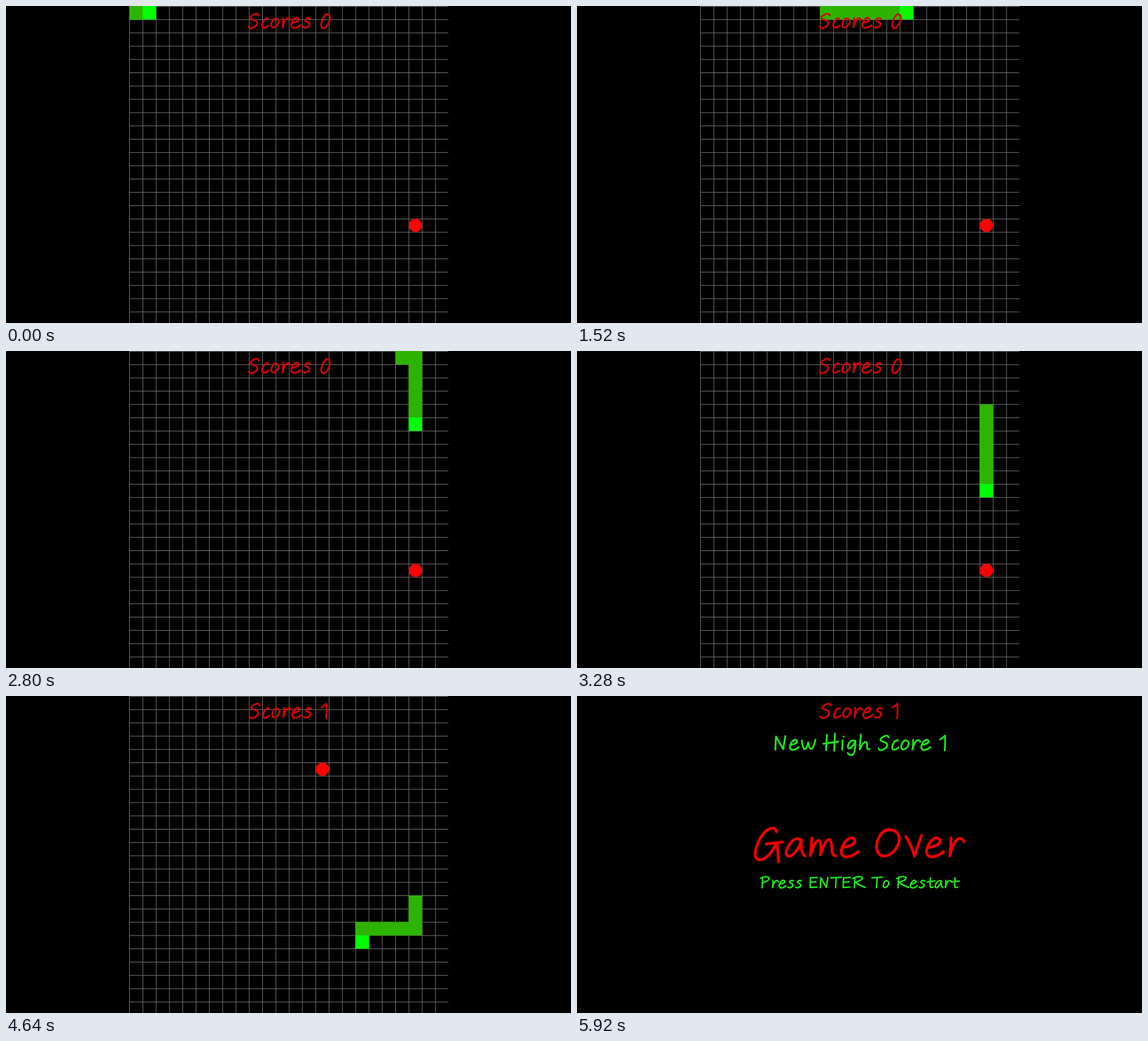
An HTML page with a canvas for the animation above (6 s loop, 926 by 520 pixels).

```html
<!DOCTYPE html>
<html lang="en">
<head>
<meta charset="utf-8">
<title>Snake</title>
<style>
html, body { margin: 0; width: 926px; height: 520px; overflow: hidden; background: #000; }
canvas { display: block; }
</style>
</head>
<body>
<canvas id="stage" width="926" height="520" role="img" aria-label="Snake game: Scores 0, Scores 1, New High Score 1, Game Over, Press ENTER To Restart"></canvas>
<script>
const ctx = document.getElementById("stage").getContext("2d");
const LOOP = 6000, FRAME = 80, TICK = 109.4, LEAD = 20;
const LEFT = 202, CELL = 21.8, COUNT = 24;
const EAT_TICK = 36, END_TICK = 49;

// Handwritten pen strokes, 100 units per em, baseline at y = 0
const pen = {};
const glyph = (ch, advance, d) => { pen[ch] = { advance, path: new Path2D(d) }; };
glyph(" ", 34, "");
glyph("a", 62, "M40-40Q28-52 12-32C-6-6 4 4 16-2Q34-14 41-42Q38-8 50-1");
glyph("c", 44, "M30-42Q20-50 8-30C-4-6 4 2 14 0Q24-2 32-10");
glyph("e", 57, "M4-22Q42-28 36-42Q26-54 10-34C-6-6 6 3 20 1Q34-2 45-12");
glyph("g", 55, "M36-40Q22-50 8-30C-4-8 6-2 16-8Q32-22 38-42C38 0 34 26 18 26Q8 26 2 16");
glyph("h", 58, "M9-72L3-1Q20-40 34-36Q40-28 38-8Q40 0 50-2");
glyph("i", 29, "M7-44L5 0M11-62L12-61");
glyph("m", 77, "M5-46L2-2Q14-44 24-40Q30-34 27-4Q40-46 50-42Q56-36 56-12Q58-2 65-1");
glyph("o", 50, "M20-44C6-40-4-14 4-4C14 6 36-12 36-30Q34-46 16-43");
glyph("r", 43, "M7-46Q8-24 4-1Q14-42 28-45Q36-46 40-37");
glyph("s", 49, "M34-42Q24-50 12-40Q6-32 18-28C38-22 32-6 16-1Q6 2 0-4");
glyph("t", 48, "M22-62Q18-30 20-6Q24 2 38-4M0-36L48-42");
glyph("v", 52, "M2-50Q16-30 24 0Q32-26 42-53");
glyph("w", 70, "M2-44Q4-6 16-2Q26-8 32-34Q36-6 46-2Q58-10 66-47");
glyph("E", 67, "M50-64L9-62L6-2L48-4M8-34L42-37");
glyph("G", 78, "M56-62Q52-78 32-66C8-48-10 9 14 9Q38 6 56-34M30-31L71-36M58-34L61 14");
glyph("H", 83, "M16-70L12 3M54-76L50 5M0-28L70-38");
glyph("N", 69, "M3 0L6-62L40-2L50-64");
glyph("O", 72, "M34-68C10-68-4-34 2-14C8 6 36 4 52-24C66-52 52-70 26-66");
glyph("P", 70, "M12-64L9 0M0-60Q28-76 50-64Q62-46 14-32");
glyph("R", 84, "M12-64L9 0M0-58Q34-78 58-64Q64-48 14-34Q40-14 76-2");
glyph("S", 62, "M48-58Q42-72 24-62C-2-48 10-40 26-36C52-28 40-8 22 0Q4 8 0-6");
glyph("T", 70, "M0-62L66-66M33-64L29 0");
glyph("0", 57, "M28-64C8-50-4-8 8 1C22 10 44-22 44-48Q42-68 24-61");
glyph("1", 48, "M0-48Q12-54 23-66Q25-40 22 3");

function write(text, x, baseline, size, color) {
  ctx.save();
  ctx.translate(x, baseline);
  ctx.scale(size / 100, size / 100);
  ctx.strokeStyle = color;
  ctx.lineWidth = 5.5 + 100 / size;
  ctx.lineCap = ctx.lineJoin = "round";
  for (const ch of text) {
    ctx.stroke(pen[ch].path);
    ctx.translate(pen[ch].advance, 0);
  }
  ctx.restore();
}

// Head cell at a tick: right, down, left, then down off the board
function headAt(n) {
  if (n <= 20) return [Math.max(0, n + 1), 0];
  if (n <= 37) return [21, n - 20];
  if (n <= 41) return [58 - n, 17];
  return [17, n - 24];
}

function drawGrid() {
  ctx.fillStyle = "#757575";
  for (let i = 0; i < COUNT; i++) {
    ctx.fillRect(LEFT + i * CELL, 0, 1, 520);
    ctx.fillRect(LEFT, i * CELL, 523, 1);
  }
}

function drawCell([col, row], color) {
  ctx.fillStyle = color;
  ctx.fillRect(LEFT + col * CELL, row * CELL, CELL + 0.4, CELL + 0.4);
}

function drawApple(col, row) {
  ctx.fillStyle = "#f00";
  ctx.beginPath();
  ctx.arc(LEFT + (col + 0.5) * CELL + 0.4, (row + 0.5) * CELL + 0.2, CELL / 2, 0, 2 * Math.PI);
  ctx.fill();
}

function drawScore(score) {
  write("Scores " + score, score ? 399 : 397.5, 35.5, 34.8, "#d40404");
}

function drawGame(tick) {
  const eaten = tick >= EAT_TICK;
  drawGrid();
  if (eaten) drawApple(14, 5);
  else drawApple(21, 16);
  for (let i = eaten ? 7 : 6; i > 0; i--) drawCell(headAt(tick - i), "#2db400");
  drawCell(headAt(tick), "#0f0");
  drawScore(eaten ? 1 : 0);
}

function drawGameOver() {
  drawScore(1);
  write("New High Score 1", 324, 88, 34.8, "#1ce81c");
  write("Game Over", 290.5, 263, 65, "#f00000");
  write("Press ENTER To Restart", 301, 314.5, 26.3, "#1ce81c");
}

function draw() {
  const t = Math.floor((performance.now() % LOOP) / FRAME) * FRAME;
  const tick = Math.floor((t + LEAD) / TICK);
  ctx.fillStyle = "#000";
  ctx.fillRect(0, 0, 926, 520);
  if (tick < END_TICK) drawGame(tick);
  else drawGameOver();
  requestAnimationFrame(draw);
}
draw();
</script>
</body>
</html>
```
